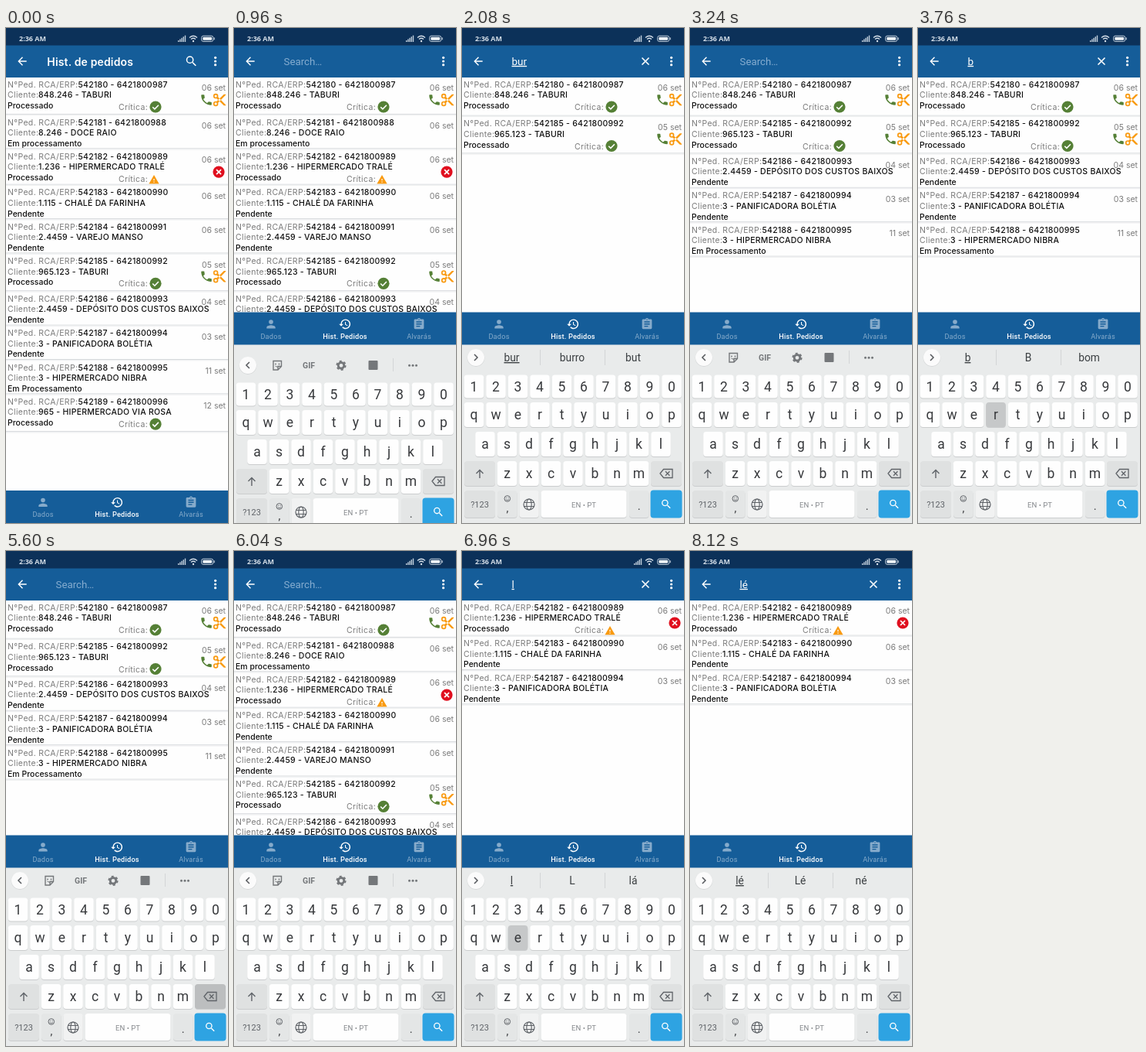
An HTML page that plays this animation: 288 px wide and 640 px high, repeating every 9.84 s.

```html
<!DOCTYPE html>
<html lang="pt">
<head>
<meta charset="utf-8">
<title>Hist. de pedidos</title>
<style>
html, body { margin: 0; width: 100%; height: 100%; overflow: hidden; background: #fefefe; }
svg { display: block; width: 288px; height: 640px; }
text { white-space: pre; }
.list { font: 500 10.5px Inter, sans-serif; letter-spacing: .25px; fill: #111; }
.list .dim { font-weight: 400; fill: #7b7b7b; letter-spacing: .35px; }
.list .date { font-weight: 400; fill: #7b7b7b; letter-spacing: 0; }
.ui { font-family: Roboto, sans-serif; }
</style>
</head>
<body>
<svg id="stage" viewBox="0 0 288 640"></svg>
<script>
const LOOP = 9840, LIST_LAG = 160, RISE = 230.5;
const OPEN_AT = 760, OPEN_TIME = 310;
const BLUE = '#155d99', GREEN = '#558036', ORANGE = '#f99a10', GREY = '#74777a';
const stage = document.getElementById('stage');

// id, client code, name, status, date, check mark, side icon
const orders = [
  [0, '848.246', 'TABURI', 'Processado', '06', 'ok', 'call'],
  [1, '8.246', 'DOCE RAIO', 'Em processamento', '06'],
  [2, '1.236', 'HIPERMERCADO TRALÉ', 'Processado', '06', 'warn', 'fail'],
  [3, '1.115', 'CHALÉ DA FARINHA', 'Pendente', '06'],
  [4, '2.4459', 'VAREJO MANSO', 'Pendente', '06'],
  [5, '965.123', 'TABURI', 'Processado', '05', 'ok', 'call'],
  [6, '2.4459', 'DEPÓSITO DOS CUSTOS BAIXOS', 'Pendente', '04'],
  [7, '3', 'PANIFICADORA BOLÉTIA', 'Pendente', '03'],
  [8, '3', 'HIPERMERCADO NIBRA', 'Em Processamento', '11'],
  [9, '965', 'HIPERMERCADO VIA ROSA', 'Processado', '12', 'ok']
].map(([id, code, name, status, day, mark, side]) => ({ id, code, name, status, day, mark, side }));

const queries = [
  [0, null], [640, ''],
  [1560, 'b'], [1760, 'bu'], [1960, 'bur'],
  [2680, 'bu'], [2920, 'b'], [3160, ''],
  [3600, 'b'], [3800, 'br'], [4000, 'bra'],
  [5120, 'br'], [5360, 'b'], [5600, ''],
  [6440, 'l'], [7360, 'lé']
];
const hints = {
  b: ['B', 'bom'], bu: ['bum', 'boa'], bur: ['burro', 'but'],
  br: ['Br', 'bri'], bra: ['Bra', 'bora'], l: ['L', 'lá'], 'lé': ['Lé', 'né']
};

const paths = {
  back: 'M20 11H7.83l5.59-5.59L12 4l-8 8 8 8 1.41-1.41L7.83 13H20z',
  search: 'M15.5 14h-.79l-.28-.27A6.47 6.47 0 0 0 16 9.5 6.5 6.5 0 1 0 9.5 16c1.61 0 3.09-.59 4.23-1.57l.27.28v.79l5 4.99L20.49 19zm-6 0a4.5 4.5 0 1 1 0-9 4.5 4.5 0 0 1 0 9z',
  phone: 'M6.62 10.79c1.44 2.83 3.76 5.14 6.59 6.59l2.2-2.2c.27-.27.67-.36 1.02-.24 1.12.37 2.33.57 3.57.57.55 0 1 .45 1 1V20c0 .55-.45 1-1 1-9.39 0-17-7.61-17-17 0-.55.45-1 1-1h3.5c.55 0 1 .45 1 1 0 1.25.2 2.45.57 3.57.11.35.03.74-.25 1.02z',
  person: 'M12 12a4 4 0 1 0 0-8 4 4 0 0 0 0 8zm0 2c-2.67 0-8 1.34-8 4v2h16v-2c0-2.66-5.33-4-8-4z',
  history: 'M13 3a9 9 0 0 0-9 9H1l3.89 3.89.07.14L9 12H6a7 7 0 1 1 2.06 4.94l-1.42 1.42A9 9 0 1 0 13 3zm-1 5v5l4.28 2.54.72-1.21-3.5-2.08V8z',
  clip: 'M19 3h-4.18a3 3 0 0 0-5.64 0H5a2 2 0 0 0-2 2v14a2 2 0 0 0 2 2h14a2 2 0 0 0 2-2V5a2 2 0 0 0-2-2zm-7 0a1 1 0 1 1 0 2 1 1 0 0 1 0-2zm2 14H7v-2h7zm3-4H7v-2h10zm0-4H7V7h10z',
  warn: 'M1 21h22L12 2zm12-3h-2v-2h2zm0-4h-2v-4h2z',
  blades: 'M7.2 9.4L9.4 7.2 22 20v1h-3zM7.2 14.6l2.2 2.2L22 4V3h-3z'
};

const at = (x, y, body) => `<g transform="translate(${x} ${y})">${body}</g>`;
const rect = (x, y, w, h, fill, r = 0) =>
  `<rect x="${x}" y="${y}" width="${w}" height="${h}" rx="${r}" fill="${fill}"/>`;
const disc = (x, y, r, fill) => `<circle cx="${x}" cy="${y}" r="${r}" fill="${fill}"/>`;
const ring = (x, y, r, color, w, more = '') =>
  `<circle cx="${x}" cy="${y}" r="${r}" fill="none" stroke="${color}" stroke-width="${w}" ${more}/>`;
const line = (d, color, w = 1.3) => `<path d="${d}" fill="none" stroke="${color}" stroke-width="${w}"/>`;
const icon = (name, x, y, size, fill) =>
  `<path d="${paths[name]}" fill="${fill}" transform="translate(${x - size / 2} ${y - size / 2}) scale(${size / 24})"/>`;
const label = (s, x, y, size, fill, more = '') =>
  `<text x="${x}" y="${y}" font-size="${size}" fill="${fill}" ${more}>${s}</text>`;
const MID = 'text-anchor="middle"';

function queryAt(t) {
  let found = null;
  for (const [start, q] of queries) if (t >= start) found = q;
  return found;
}

function pressedAt(t) {
  if (t >= 6960 && t < 7420) return 'e';
  for (let i = 2; i < queries.length; i++) {
    const [time, q] = queries[i];
    if (t >= time - 80 && t < time + 60)
      return q.length > queries[i - 1][1].length ? q.slice(-1) : 'del';
  }
  return '';
}

function statusBar() {
  let s = rect(0, 0, 288, 22.5, '#0c3159');
  s += label('2:36 AM', 17, 17, 9, '#d4dee8', 'font-weight="700" font-family="Open Sans, sans-serif"');
  for (let i = 0; i < 5; i++) s += rect(223 + i * 2.2, 16 - i * 1.6, 1.4, 2 + i * 1.6, '#c3d0dd');
  s += line('M238 12.5q5-4.5 10 0M240 14.6q3-2.6 6 0', '#d4dee8', 1.3) + disc(243, 17, 1.2, '#d4dee8');
  s += `<rect x="253.7" y="10.2" width="15" height="7.2" rx="2.2" fill="none" stroke="#c3d0dd"/>`;
  return s + rect(255.3, 11.8, 11.8, 4, '#eef3f7', 1) + rect(269.6, 12.3, 1.2, 3, '#c3d0dd');
}

function appBar(q) {
  let s = rect(0, 22, 288, 42, BLUE) + icon('back', 21, 43, 17, '#fff');
  for (const y of [38.3, 43, 47.7]) s += disc(271.6, y, 1.6, '#fff');
  if (q === null) {
    s += label('Hist. de pedidos', 53.3, 48.5, 14, '#fff',
      'font-weight="600" letter-spacing=".15" font-family="Inter, sans-serif"');
    return s + icon('search', 240.5, 43, 18, '#fff');
  }
  if (!q) return s + label('Search…', 64.5, 47.8, 13.3, '#86add0');
  return s + label(q, 64.5, 47.8, 13.5, '#fff', 'text-decoration="underline"')
    + line('M233.5 38.5l9 9m0-9l-9 9', '#fff', 1.6);
}

function mark(kind, y) {
  if (kind === 'warn') return icon('warn', 192, y + 30, 14.5, ORANGE);
  return disc(194, y + 29, 7.6, GREEN) + line(`M190.2 ${y + 29.2}l2.7 2.7 5-5.2`, '#fff', 1.6);
}

function sideIcon(kind, y) {
  if (kind === 'fail')
    return disc(276, y + 20, 7.6, '#e0101f') + line(`M273 ${y + 17}l6 6m0-6l-6 6`, '#fff', 1.7);
  return icon('phone', 260, y + 20, 18, GREEN) + icon('blades', 277, y + 20, 19.5, ORANGE)
    + ring(272.1, y + 15.1, 2.4, ORANGE, 1.7) + ring(272.1, y + 24.9, 2.4, ORANGE, 1.7);
}

function row(o, y, h) {
  let s = `<text x="2" y="${y + 3.8}" class="dim">N°Ped. RCA/ERP:</text>`
    + `<text x="93.5" y="${y + 3.8}">54218${o.id} - 64218009${87 + o.id}</text>`
    + `<text x="2" y="${y + 17.2}" class="dim">Cliente:</text>`
    + `<text x="42" y="${y + 17.2}">${o.code} - ${o.name}</text>`
    + `<text x="2" y="${y + 31}" letter-spacing="0">${o.status}</text>`
    + `<text x="285" y="${y + 8.3}" class="date" text-anchor="end">${o.day} set</text>`;
  if (o.mark) s += `<text x="146" y="${y + 33}" class="dim">Crítica:</text>` + mark(o.mark, y);
  if (o.side) s += sideIcon(o.side, y);
  return s + rect(0, y + h - 10.8, 288, 1, '#d6d9dc') + rect(0, y + h - 9.8, 288, 1.4, '#f0f1f2');
}

function list(filter) {
  const shown = orders.filter(o => o.name.toLowerCase().includes(filter || ''));
  let y = 73, s = '';
  shown.forEach((o, i) => {
    const next = shown[i + 1];
    let h = o.mark === 'ok' ? 48.7 : o.mark ? 46.4 : 44.4;
    if (o.mark && next && next.mark === o.mark) h += 1.8;
    s += row(o, y, h);
    y += h;
  });
  return `<g class="list">${s}</g>`;
}

function navBar() {
  const tabs = [['person', 'Dados', 48], ['history', 'Hist. Pedidos', 144], ['clip', 'Alvarás', 240]];
  return rect(0, 0, 288, 42.5, BLUE) + tabs.map(([name, text, x], i) => {
    const color = i === 1 ? '#fff' : '#86abcb';
    return icon(name, x, 15.3, 17, color)
      + label(text, x, 34.3, 9.2, color, `${MID} letter-spacing=".2" font-weight="${i === 1 ? 500 : 400}"`);
  }).join('');
}

function strip(q) {
  const dir = q ? 1 : -1;
  let s = disc(18, 426.6, 11.3, '#d5d7d8') + disc(18, 426, 11, '#fbfbfb')
    + line(`M${18 - 2 * dir} 422l${4 * dir} 4l${-4 * dir} 4`, '#55585c', 1.5);
  if (q) {
    s += label(q, 64.5, 431, 13.8, '#3c4043', `${MID} text-decoration="underline"`);
    hints[q].forEach((w, i) => s += label(w, 143 + 79 * i, 431, 13.8, '#3c4043', MID));
    return s + rect(101, 416, 1, 20, '#d3d5d6') + rect(185, 416, 1, 20, '#d3d5d6');
  }
  s += line('M51 420.5h10.5v7l-4.5 4.5h-6zM61.5 427.5h-4.5v4.5', GREY, 1.4)
    + disc(54, 424.5, .9, GREY) + disc(58.5, 424.5, .9, GREY) + line('M53.5 427q2.5 2.5 5 0', GREY, 1);
  s += label('GIF', 97, 429.8, 10.5, GREY, `${MID} font-weight="700"`);
  s += ring(139, 426.3, 3.8, GREY, 2.8) + ring(139, 426.3, 5.7, GREY, 1.8, 'stroke-dasharray="2.98"');
  s += rect(174.5, 420, 12, 12, GREY, 1) + rect(206, 417, 1, 17, '#d3d5d6');
  for (const x of [227.5, 232, 236.5]) s += disc(x, 426.3, 1.5, GREY);
  return s;
}

function key(x, y, w, h, fill) {
  return rect(x, y + 1, w, h, '#cbcdce', 4) + rect(x, y, w, h, fill, 4);
}

function keyRow(chars, x, y, h, pressed) {
  return [...chars].map((c, i) => {
    const cx = x + 28.5 * i;
    return key(cx - 12.8, y, 25.6, h, c === pressed ? '#c6c8c9' : '#fefefe')
      + label(c, cx, y + h / 2 + 6, 17.5, '#37393c', MID);
  }).join('');
}

function keyboard(q, pressed) {
  const soft = '#dfe1e1', pale = '#e4e6e6', ink = '#5f6368';
  let s = strip(q);
  s += keyRow('1234567890', 15.5, 448.5, 30, pressed) + keyRow('qwertyuiop', 15.5, 484, 32, pressed)
    + keyRow('asdfghjkl', 30, 522, 32, pressed) + keyRow('zxcvbnm', 58.5, 560, 32, pressed);
  s += key(3, 560, 40, 32, soft) + line('M23 582v-10.5m-4.5 4.5l4.5-4.5 4.5 4.5', ink, 1.4);
  s += key(245, 560, 40, 32, pressed === 'del' ? '#bcbebf' : soft)
    + line('M257 576l4.5-5.5h11.5v11h-11.5zM264 573.3l5.4 5.4m0-5.4l-5.4 5.4', ink, 1.3);
  s += key(3, 598, 40, 35, soft) + label('?123', 23, 619.8, 11, ink, MID);
  s += key(46, 598, 25.5, 35, pale) + ring(58.8, 608.5, 3.8, ink, 1)
    + disc(57.5, 607.5, .6, ink) + disc(60.1, 607.5, .6, ink) + line('M56.7 609.6q2.1 2 4.2 0', ink, .9)
    + label(',', 58.8, 626, 14, '#37393c', MID);
  s += key(74.3, 598, 25.5, 35, '#f1f2f2') + ring(87, 616, 7, ink, 1.2)
    + `<ellipse cx="87" cy="616" rx="3.2" ry="7" fill="none" stroke="${ink}" stroke-width="1.1"/>`
    + line('M80.5 613.5h13m0 5h-13', ink, 1.1);
  s += key(102.5, 598, 111, 35, '#fefefe') + label('EN • PT', 158, 619.5, 9.5, '#85888c', MID);
  s += key(217, 598, 25.5, 35, pale) + label('.', 229.7, 623, 15, '#37393c', MID);
  return s + rect(244.5, 597.5, 41, 36, '#2ea3e2', 4) + icon('search', 265, 615.7, 16, '#fff');
}

let last = '';
function draw(t) {
  const q = queryAt(t), open = t >= OPEN_AT;
  const p = Math.min(1, Math.max(0, (t - OPEN_AT) / OPEN_TIME));
  let ui = appBar(q) + statusBar() + at(0, open ? 598 - RISE : 598, navBar());
  if (open) ui += rect(0, 409.5, 288, 231, '#e9ebeb') + at(0, RISE * (1 - p) ** 3, keyboard(q, pressedAt(t)));
  const svg = rect(0, 0, 288, 640, '#fefefe') + list(queryAt(t - LIST_LAG)) + `<g class="ui">${ui}</g>`;
  if (svg !== last) stage.innerHTML = last = svg;
}

const start = performance.now();
function tick() {
  draw((performance.now() - start) % LOOP);
  requestAnimationFrame(tick);
}
tick();
</script>
</body>
</html>
```
